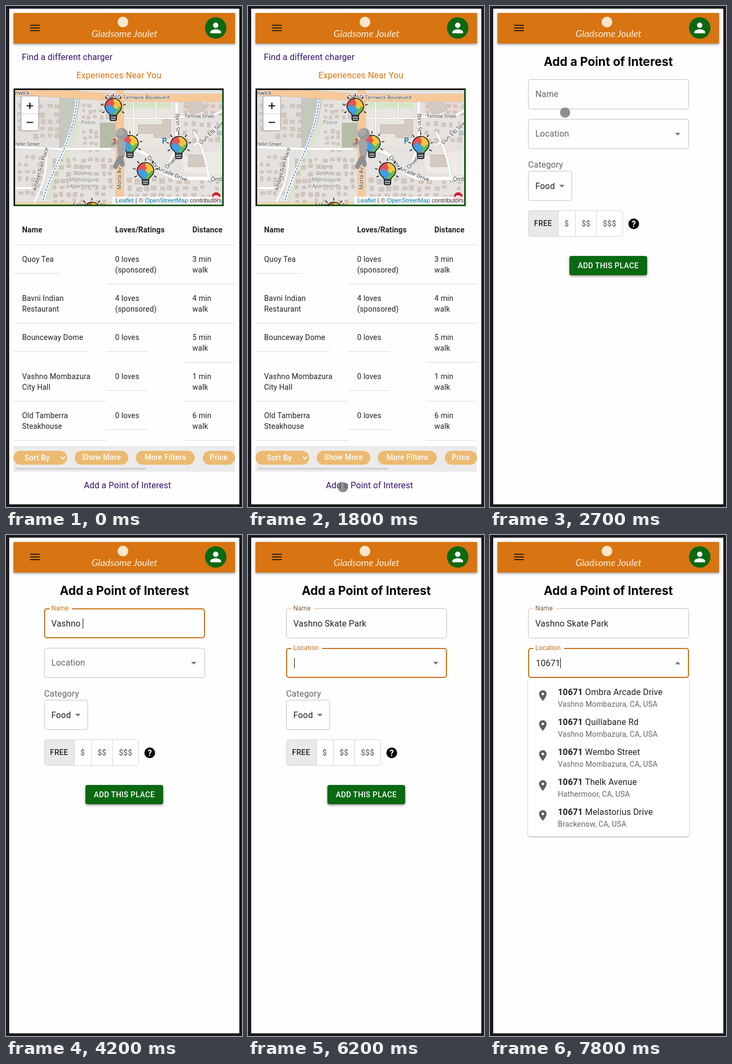
Animation, 440 px wide and 936 px high, one loop 8000 ms. Source, as an HTML page:

```html
<!DOCTYPE html>
<html lang="en">
<head>
<meta charset="utf-8">
<title>Add a point of interest</title>
<style>
  html, body { margin: 0; width: 100%; height: 100%; overflow: hidden; background: #1b1a1e; }
  svg { display: block; width: 440px; height: 936px; }
  text { font-family: Roboto, sans-serif; white-space: pre; }
  .ui { font-family: Inter, sans-serif; }
  .map { font-family: "Noto Sans", sans-serif; font-size: 10px; fill: #333; stroke: #fff; stroke-width: 2px; stroke-opacity: .7; paint-order: stroke; }
  .area { font-style: italic; fill: #777; }
  .body { font-size: 16px; letter-spacing: .15px; }
  .cell { font-size: 14px; letter-spacing: .15px; fill: #222; }
  .bold { font-weight: 500; }
  .shadow { filter: drop-shadow(0 2px 2px rgba(0,0,0,.4)); }
</style>
</head>
<body>
<svg id="stage" viewBox="0 0 440 936" xmlns="http://www.w3.org/2000/svg"></svg>
<script>
const LOOP = 8000, STEP = 100;
const ORANGE = '#d87411', GREEN = '#0a6911', PURPLE = '#32106f', GREY = '#666';

const text = (x, y, s, attrs = '') => `<text x="${x}" y="${y}" ${attrs}>${s}</text>`;
const rect = (x, y, w, h, fill, attrs = '') => `<rect x="${x}" y="${y}" width="${w}" height="${h}" fill="${fill}" ${attrs}/>`;
const circle = (x, y, r, fill, attrs = '') => `<circle cx="${x}" cy="${y}" r="${r}" fill="${fill}" ${attrs}/>`;
const line = (d, color, width, attrs = '') => `<path d="${d}" fill="none" stroke="${color}" stroke-width="${width}" ${attrs}/>`;
const shape = (d, fill, attrs = '') => `<path d="${d}" fill="${fill}" ${attrs}/>`;
const group = (attrs, ...parts) => `<g ${attrs}>${parts.join('')}</g>`;
const middle = 'text-anchor="middle"';

let seed = 11;
const random = () => (seed = seed * 16807 % 2147483647) / 2147483647;

function header() {
  return group('',
    rect(14, 13, 413, 57, ORANGE, 'class="shadow"'),
    ...[36, 41, 46].map(y => rect(45, y - 1, 18, 2, '#2b2118')),
    circle(218, 30, 10, '#f9e6cb'),
    text(221, 58, 'Gladsome Joulet', `${middle} font-size="18" style="font-family:Lato,sans-serif;font-style:italic" fill="#fdf1df"`),
    circle(391, 41, 20, GREEN),
    shape('M12 12a4 4 0 1 0 0-8a4 4 0 0 0 0 8m0 2c-2.67 0-8 1.34-8 4v2h16v-2c0-2.66-5.33-4-8-4', '#fff',
      'transform="translate(376 26) scale(1.25)"'));
}

// Little houses on a jittered grid
function houses(x0, y0, x1, y1, step, color = '#d2c7be') {
  let out = '';
  for (let y = y0; y < y1; y += step)
    for (let x = x0; x < x1; x += step) {
      if (random() < .15) continue;
      const w = step * (.35 + random() * .3), h = step * (.35 + random() * .3);
      out += rect((x + random() * 4).toFixed(1), (y + random() * 4).toFixed(1), w.toFixed(1), h.toFixed(1), color, 'stroke="#c1b4aa" stroke-width=".6"');
    }
  return out;
}

function road(d, width, color = '#fff') {
  return line(d, '#c9c4c0', width + 1.2) + line(d, color, width);
}

function bulb(x, y) {
  let rays = '';
  for (let a = 150; a <= 390; a += 40) {
    const c = Math.cos(a * Math.PI / 180), s = Math.sin(a * Math.PI / 180);
    rays += `M${19 * c} ${19 * s}L${23 * c} ${23 * s}`;
  }
  return group(`transform="translate(${x} ${y})"`,
    line(rays, '#222', 1.6, 'stroke-linecap="round"'),
    rect(-6, 13, 12, 13, '#a8b0bb', 'rx="3" stroke="#222" stroke-width="1.8"'),
    line('M-6 18H6M-6 22H6', '#222', 1.6),
    shape('M0 0H-15.5A15.5 15.5 0 0 1 0 -15.5Z', '#ec4f51'),
    shape('M0 0V-15.5A15.5 15.5 0 0 1 15.5 0Z', '#f8c63e'),
    shape('M0 0V16H-6C-7 11 -15 9 -15.5 0Z', '#3f9fe6'),
    shape('M0 0H15.5C15 9 7 11 6 16H0Z', '#63bd58'),
    circle(-1, -6, 3.2, '#ec4f51'), circle(6, 1, 3.2, '#f8c63e'),
    circle(1, 7, 3, '#3f9fe6'), circle(-7, -1, 3, '#3f9fe6'),
    line('M-6 16C-7 11 -15.5 9 -15.5 0A15.5 15.5 0 0 1 15.5 0C15.5 9 7 11 6 16Z', '#222', 1.7));
}

function figure() {
  return group('',
    line('M213 252Q222 268 214 284L217 296M213 282L204 300', '#8f8f8f', 9, 'stroke-linecap="round"'),
    line('M212 254L198 258', '#999', 5, 'stroke-linecap="round"'),
    shape('M206 251Q218 244 223 256L222 276Q214 284 208 276Z', '#a5a5a5'),
    circle(216, 239, 11, '#999'), circle(213, 236, 7, '#aaa'),
    text(199, 257, '?', 'font-size="13" font-weight="700" fill="#d0202c"'));
}

function map() {
  const tilted = (x, y, a, s) => text(x, y, s, `class="map" transform="rotate(${a} ${x} ${y})"`);
  const stream = 'M133 172C128 215 120 240 107 270S76 330 67 372';
  return rect(14, 154, 392, 220, '#0b5415') + shape('M14 374V154H406L403 157H17V371Z', '#141414') +
    group('clip-path="url(#mapClip)"',
      rect(17, 157, 386, 214, '#e5e2df'),
      shape('M17 176H99V262L17 264Z', '#e1dedb'),
      shape('M99 172H139L131 215Q126 248 112 268H99Z', '#c5c8bd'),
      shape('M112 268L131 215L141 218L118 275L78 371H60Z', '#dce3cf'),
      shape('M175 218H206V265H175Z', '#b6bda6'),
      shape('M222 180H312V262H222Z', '#e9e6e0'),
      shape('M222 181H308V192H222Z', '#d5e5c4'),
      shape('M324 178H403V200H330Z', '#e8d9d4'),
      shape('M326 280L403 270V316L332 310Z', '#eeebe6'),
      houses(20, 278, 62, 345, 13), houses(86, 282, 200, 366, 13, '#d3c3ba'),
      houses(140, 180, 202, 212, 11), houses(142, 230, 172, 264, 11),
      houses(20, 182, 92, 250, 14), houses(330, 182, 398, 202, 13),
      houses(330, 215, 398, 258, 15), houses(225, 320, 398, 355, 15),
      shape('M247 222H292V212H307V246H276V238H247Z', '#d4cac2', 'stroke="#c1b4aa"'),
      shape('M333 182L360 176L372 194L345 204Z', '#d4cac2', 'stroke="#c1b4aa"'),
      shape('M340 278H372V300H340Z', '#d4cac2', 'stroke="#c1b4aa"'),
      road('M17 264L96 267H196M75 267Q80 320 50 371M17 340H58', 4),
      road('M222 210H318M280 178V210M238 178V268', 2),
      road('M318 178V240Q318 275 298 302', 5),
      road('M324 207H380L403 196M350 260Q380 245 403 214M350 235Q372 270 378 322', 4),
      road('M220 267Q258 266 270 288T318 322H403', 7),
      line(stream, '#fff', 5), line(stream, '#3b6fd8', 1.5, 'stroke-dasharray="4 2"'),
      road('M17 371H403', 8, '#f8d7a8'),
      road('M212 157V371', 14, '#f7c898'),
      road('M10 161Q90 162 160 168T410 171', 14, '#f7c898'),
      rect(184, 164, 31, 12, '#f5cfc6', 'rx="2"'),
      text(17, 166, 'nwick', 'class="map"'), text(186, 174, 'QA 60', 'class="map"'),
      text(218, 174, 'Tarnwick Boulevard', 'class="map" style="font-size:9.5px"'),
      text(15, 261, 'Pellin Street', 'class="map" style="font-size:8.5px"'),
      text(334, 209, 'Fennow Street', 'class="map" style="font-size:8px"'),
      tilted(56, 346, -74, 'Ambrel Trail Place'), tilted(215, 343, -90, 'Morla Av'),
      tilted(316, 201, 88, 'Ibrin St'), tilted(300, 305, -45, 'Orvel A'),
      tilted(364, 259, -43, 'Dun Elb Street'),
      tilted(262, 283, 50, 'Ombra'), tilted(281, 306, 22, 'Arcade Drive'),
      text(382, 327, 'Ombra', 'class="map"'), text(125, 375, 'Selwin Route', 'class="map"'),
      text(153, 221, 'Palvia', `class="map area" ${middle}`),
      ...['Ulena', 'Vashno', 'Mombazura', 'Apartments'].map((s, i) => text(145, 304 + 12 * i, s, `class="map area" ${middle}`)),
      text(291, 257, 'P', 'font-size="14" font-weight="700" fill="#1a78c2"'),
      text(395, 245, 'P', 'font-size="14" fill="#7db4dd"'),
      bulb(200, 188), bulb(231, 257), bulb(260, 308), bulb(322, 259), bulb(160, 382), figure(),
      circle(392, 356, 8, '#d0202c'), rect(388, 354, 8, 3, '#fff'),
      rect(198, 356, 205, 15, '#fff', 'opacity=".8"'),
      text(204, 367, '<tspan fill="#0078a8">Leaflet</tspan> | © <tspan fill="#0078a8">OpenStreetMap</tspan> contributors',
        'font-size="11.4" fill="#333" style="font-family:\'Liberation Sans\',sans-serif"'),
      rect(28, 168, 33, 65, '#fff', 'rx="4" stroke="#aaa" stroke-width="1.5"'),
      line('M29 201H60', '#ccc', 1),
      line('M38.5 186.5H50.5M44.5 180.5V192.5M38.5 217.5H50.5', '#111', 2.2));
}

function table() {
  const rows = [
    ['Quoy Tea', '', '0 loves', '(sponsored)', 3],
    ['Bavni Indian', 'Restaurant', '4 loves', '(sponsored)', 4],
    ['Bounceway Dome', '', '0 loves', '', 5],
    [HOME, 'City Hall', '0 loves', '', 1],
    ['Old Tamberra', 'Steakhouse', '0 loves', '', 6]
  ];
  const cell = (x, y, a, b) => text(x, y, a, 'class="cell"') + (b && text(x, y + 20, b, 'class="cell"'));
  const head = (x, s) => text(x, 423, s, 'class="cell" font-weight="700"');
  const rules = 'M14 446.5H427M14 499.5H101M187 519.5H427M14 592.5H427M14 645.5H152M187 645.5H264M332 665.5H427' +
    'M14 738.5H187M187 718.5H264M332 738.5H427M14 811.5H187M187 791.5H264M332 811.5H427';
  return head(30, 'Name') + head(203.5, 'Loves/Ratings') + head(347.5, 'Distance') + line(rules, '#dcdcdc', 1) +
    rows.map(([a, b, c, d, min], i) => {
      const y = 478 + 73 * i;
      return cell(30, y, a, b) + cell(203.5, y, c, d) + cell(347.5, y, `${min} min`, 'walk');
    }).join('');
}

function filters() {
  const pill = (x, w, label, cx, y = 848) => rect(x, 831, w, 26, '#ecba71', 'rx="13"') +
    text(cx, y, label, `${middle} class="bold" font-size="14" letter-spacing=".2" fill="#fff"`);
  return rect(14, 822, 413, 48, '#ebebeb') + pill(14, 100, 'Sort By', 58, 849) + line('M102 842L106 846L110 842', '#fff', 1.8) +
    pill(128, 100, 'Show More', 178) + pill(242, 110, 'More Filters', 297) + pill(367, 60, 'Price', 396.5) +
    rect(18, 863, 244, 3, '#cfcfcf', 'rx="1.5"');
}

function listPage() {
  const link = (x, y, s, color, attrs = '') => text(x, y, s, `class="body" fill="${color}" ${attrs}`);
  return link(29.5, 101, 'Find a different charger', PURPLE) + link(210.5, 135, 'Experiences Near You', ORANGE, middle) +
    map() + table() + filters() + link(226.5, 901, 'Add a Point of Interest', PURPLE, middle);
}

function field(id, x, y) {
  return group(`id="${id}"`,
    rect(0, 0, 0, 0, 'none', 'rx="4" class="frame"'),
    rect(81, y - 2, id === 'name' ? 42 : 57, 5, '#fff', 'class="notch"'),
    `<text class="label body">${id === 'name' ? 'Name' : 'Location'}</text>`,
    text(x, y + 34, '', 'class="value body" fill="#222"'),
    rect(0, y + 19, 1, 19, '#111', 'class="caret"'));
}

function formPage() {
  const option = (x, s, color = GREY) => text(x, 411, s, `${middle} class="bold" font-size="14" letter-spacing=".4" fill="${color}"`);
  return text(220.5, 112, 'Add a Point of Interest', `${middle} class="ui" font-size="22.3" font-weight="700"`) +
    field('name', 84.5, 137) + field('place', 85.5, 211) +
    text(71, 302, 'Category', `class="body" fill="${GREY}"`) +
    rect(71.5, 308.5, 81, 55, 'none', 'rx="4" stroke="#c0c0c0"') +
    text(84.5, 342, 'Food', 'class="body" fill="#222"') + shape('M129 334H139L134 339Z', '#757575') +
    rect(71.5, 382.5, 176, 48, '#fff', 'rx="4"') + shape('M127 383H75Q72 383 72 386V427Q72 430 75 430H127Z', '#e8eaea') +
    rect(71.5, 382.5, 176, 48, 'none', 'rx="4" stroke="#d4d4d4"') + line('M127.5 383V430M159.5 383V430M198.5 383V430', '#d4d4d4', 1) +
    option(99, 'FREE', '#222') + option(143, '$') + option(179, '$$') + option(223, '$$$') +
    circle(268, 407, 10, '#000') + text(268, 412.5, '?', `${middle} font-size="16" font-weight="700" fill="#fff"`) +
    rect(148, 467, 145, 36, GREEN, 'rx="4" class="shadow"') +
    text(220.5, 490, 'ADD THIS PLACE', `${middle} class="bold" font-size="14" letter-spacing=".4" fill="#fff"`) +
    group('id="popup"', rect(71, 267, 300, 296, '#fff', 'rx="4" style="filter:drop-shadow(0 1px 1.5px rgba(0,0,0,.35))"'), '<g id="options"></g>') +
    shape('', '#757575', 'id="arrow"');
}

const HOME = 'Vashno Mombazura';
const SUGGESTIONS = {
  106: [['55 Brimo Avenue', HOME], ['60 Ostrel Street', HOME], ['0 Tannerow Avenue', 'Calvera'],
    ['67 Merlow Boulevard', HOME], ['21 Ulk Street', HOME]],
  10671: [[' Ombra Arcade Drive', HOME], [' Quillabane Rd', HOME], [' Wembo Street', HOME],
    [' Thelk Avenue', 'Hathermoor'], [' Melastorius Drive', 'Brackenow']]
};
function options(prefix) {
  return SUGGESTIONS[prefix].map(([rest, city], i) => {
    const y = 299 + 56 * i;
    return shape('M12 2C8.13 2 5 5.13 5 9c0 5.25 7 13 7 13s7-7.75 7-13c0-3.87-3.13-7-7-7m0 9.5a2.5 2.5 0 1 1 0-5a2.5 2.5 0 0 1 0 5',
      '#5f5f5f', `transform="translate(86.5 ${y - 11})"`) +
      text(126.5, y, `<tspan font-weight="700">${prefix}</tspan>${rest}`, 'class="body" fill="#222"') +
      text(126.5, y + 22, `${city}, CA, USA`, `class="cell" style="fill:${GREY}"`);
  }).join('');
}

const stage = document.getElementById('stage');
stage.innerHTML = '<defs><clipPath id="mapClip"><rect x="17" y="157" width="386" height="214"/></clipPath></defs>' +
  rect(0, 0, 440, 936, '#1b1a1e') + rect(6, 5, 429, 926, '#fefefe') +
  group('id="list"', listPage()) + group('id="form"', formPage()) + header() +
  circle(0, 0, 9.5, '#6b676b', 'id="touch" opacity=".75"');

const $ = id => document.getElementById(id);
const show = (el, on) => el.setAttribute('display', on ? 'inline' : 'none');
const clamp = v => Math.max(0, Math.min(1, v));
const ease = v => v * v * (3 - 2 * v);

const SHOW_FORM = 2100, NAME_FOCUS = 3000, PLACE_FOCUS = 5800, POPUP = 6900, REFINE = 7600;
const NAME = 'Vashno Skate Park', NUMBER = '10671';
const KEYS = [6500, 6700, 6900, 7300, 7500];

function setAll(el, attrs) {
  for (const key in attrs) el.setAttribute(key, attrs[key]);
}

function updateField(id, y, t, focusAt, blurAt, value, lastKey) {
  const find = c => $(id).querySelector('.' + c);
  const focused = t >= focusAt && t < blurAt;
  const lift = ease(clamp((t - focusAt) / 200));
  const label = find('label'), input = find('value'), caret = find('caret');
  const border = focused ? 2 : 1;
  // The border lies wholly inside the 300 by 56 box
  setAll(find('frame'), {
    x: 71 + border / 2, y: y + border / 2, width: 300 - border, height: 56 - border,
    stroke: focused ? '#cb6f18' : '#c0c0c0', 'stroke-width': border
  });
  show(find('notch'), lift > .3);
  setAll(label, {
    transform: `translate(84.5 ${y + 33 - 29 * lift}) scale(${1 - .25 * lift})`,
    fill: focused ? '#c56d18' : t >= blurAt ? '#7e5b3d' : GREY
  });
  input.textContent = value;
  const blink = (t - Math.max(focusAt, lastKey)) % 1000 < 500;
  show(caret, focused && blink);
  caret.setAttribute('x', Math.round(+input.getAttribute('x') + (value ? input.getComputedTextLength() : 0)));
}

// Touch dot: time, x, y
const PATH = [[1400, 196, 946], [1700, 177, 899], [2200, 177, 899], [2700, 140, 199], [2900, 150, 168], [3200, 150, 168]];
function updateTouch(t) {
  const i = PATH.findIndex((p, k) => k < PATH.length - 1 && t >= p[0] && t < PATH[k + 1][0]);
  show($('touch'), i >= 0);
  if (i < 0) return;
  const [a, b] = [PATH[i], PATH[i + 1]], k = ease((t - a[0]) / (b[0] - a[0]));
  $('touch').setAttribute('transform', `translate(${a[1] + (b[1] - a[1]) * k} ${a[2] + (b[2] - a[2]) * k})`);
}

let listed = '';
function draw(t) {
  const onForm = t >= SHOW_FORM, open = t >= POPUP;
  show($('list'), !onForm);
  show($('form'), onForm);
  const typed = Math.max(0, Math.min(NAME.length, Math.floor((t - 3360) / 120)));
  const digits = KEYS.filter(k => t >= k).length;
  updateField('name', 137, t, NAME_FOCUS, PLACE_FOCUS, NAME.slice(0, typed), typed ? 3360 + 120 * typed : 0);
  updateField('place', 211, t, PLACE_FOCUS, LOOP, NUMBER.slice(0, digits), digits ? KEYS[digits - 1] : 0);
  show($('popup'), open);
  $('arrow').setAttribute('d', open ? 'M345 241.5H355L350 236.5Z' : 'M345 237H355L350 242Z');
  const prefix = t >= REFINE ? '10671' : '106';
  if (prefix !== listed) $('options').innerHTML = options(listed = prefix);
  updateTouch(t);
}

const start = performance.now();
function tick() {
  const t = (performance.now() - start) % LOOP;
  draw(Math.floor(t / STEP) * STEP);
  requestAnimationFrame(tick);
}
tick();
</script>
</body>
</html>
```
